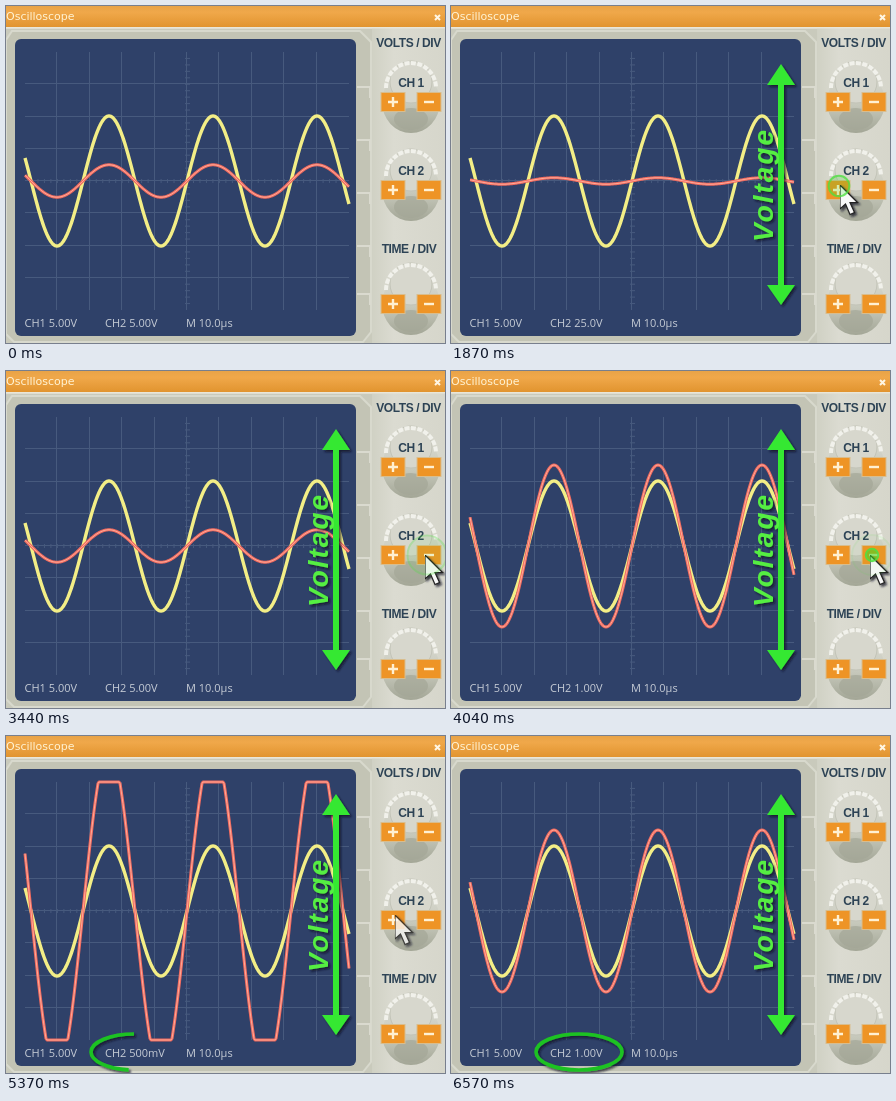
An HTML page for the animation above (6.97 s loop, 439 by 337 pixels).

```html
<!DOCTYPE html>
<html lang="en">
<head>
<meta charset="utf-8">
<title>Oscilloscope</title>
<style>
html, body { margin: 0; width: 100%; height: 100%; overflow: hidden; background: #d5d5ca; }
svg { display: block; width: 439px; height: 337px; }
.readout { font: 11px "Open Sans", sans-serif; fill: #c6ccd6; }
.label { font: bold 12px "Liberation Sans", Arial, sans-serif; letter-spacing: -.4px; fill: #2d4355; text-anchor: middle; }
.trace { fill: none; stroke-linejoin: round; }
</style>
</head>
<body>
<svg viewBox="0 0 439 337">
  <defs>
    <linearGradient id="bar" x2="0" y2="1">
      <stop stop-color="#e8a347"/><stop offset=".3" stop-color="#f0a84a"/><stop offset="1" stop-color="#e1942f"/>
    </linearGradient>
    <linearGradient id="side">
      <stop stop-color="#d0d1c4"/><stop offset=".3" stop-color="#dbdbd1"/><stop offset="1" stop-color="#d6d6cb"/>
    </linearGradient>
    <linearGradient id="base" x2="0" y2="1">
      <stop stop-color="#dcdcd3"/><stop offset=".55" stop-color="#c6c8bb"/><stop offset="1" stop-color="#a3a696"/>
    </linearGradient>
    <filter id="shadow" filterUnits="userSpaceOnUse" x="0" y="0" width="439" height="337">
      <feDropShadow dx="2" dy="2" stdDeviation="1.2" flood-color="#0c1420" flood-opacity=".75"/>
    </filter>
  </defs>

  <!-- case -->
  <rect width="439" height="337" fill="#d5d5ca"/>
  <rect y="23" width="366" height="314" fill="#c9cabc"/>
  <path d="M0 34L6 25H354L365 36V326L357 336H8L0 328Z" fill="#c3c4b5" stroke="#d8d9cd" stroke-width="2"/>
  <path d="M351 81H364V92M351 134H364V145M351 187H364V198M351 240H364V251M351 288H364V299" fill="none" stroke="#dadacf" stroke-width="2"/>
  <rect x="366" y="22" width="73" height="315" fill="url(#side)"/>
  <rect width="439" height="21" fill="url(#bar)"/>
  <rect y="21" width="439" height="1.5" fill="#e9e6d8"/>
  <text y="14" style="font:11px 'DejaVu Sans',sans-serif" fill="#fff3d4">Oscilloscope</text>
  <path d="M429 9l5 5m0-5l-5 5" stroke="#fff6e4" stroke-width="2"/>
  <rect x="9" y="33" width="341" height="297" rx="6" fill="#2f4169"/>

  <path id="grid" fill="none" stroke="#475a7e"/>
  <path id="yellow" class="trace" stroke="#f3ee86" stroke-width="3.4"/>
  <path id="red" class="trace" stroke="#f16b5f" stroke-width="3"/>
  <path id="core" class="trace" stroke="#ffaa98" stroke-width="1"/>
  <g class="readout">
    <text x="18.5" y="321">CH1 5.00V</text>
    <text id="volts" x="99" y="321"></text>
    <text x="180" y="321">M 10.0µs</text>
  </g>

  <g id="knobs"></g>
  <g class="label">
    <text x="402.5" y="41">VOLTS / DIV</text>
    <text x="405" y="81">CH 1</text>
    <text x="405" y="168.500">CH 2</text>
    <text x="403" y="247">TIME / DIV</text>
  </g>

  <g id="arrow" filter="url(#shadow)" fill="#36e832">
    <path d="M330 58L344 79H333V279H344L330 299L316 279H327V79H316Z"/>
    <text transform="translate(322 236) rotate(-90)" fill="#55ee42" letter-spacing="2"
      style="font:italic bold 28px 'Liberation Sans',Arial,sans-serif">Voltage</text>
  </g>
  <path id="loop" filter="url(#shadow)" d="M128 298A43 18 0 0 0 128 334A43 18 0 0 0 128 298" pathLength="100"
    fill="none" stroke="#1fc222" stroke-width="3.6"/>
  <g id="cursors"></g>
  <g id="rings"></g>
</svg>
<script>
const $ = id => document.getElementById(id);
const LOOP = 6970, LIFE = 600, LEFT = 19, RIGHT = 343, TOP = 46, BOTTOM = 304, MID = 175;
const clamp = (v, lo = 0, hi = 1) => Math.min(hi, Math.max(lo, v));
const ramp = (t, from, to) => clamp((t - from) / (to - from));

// [time, volts per division, button: 0 plus, 1 minus]
const clicks = [
  [1030, 10, 0], [1750, 25, 0], [2540, 10, 1], [3020, 5, 1],
  [3500, 2.5, 1], [3980, 1, 1], [4460, .5, 1], [5970, 1, 0]
];
const ringAt = [[388, 180], [421, 184]];

function wave(amp) {
  let d = "";
  for (let x = LEFT; x <= RIGHT; x++) {
    const y = MID - amp * Math.sin((x - 181) * Math.PI / 52);
    d += (d ? "L" : "M") + x + " " + clamp(y, TOP, BOTTOM).toFixed(2);
  }
  return d;
}

function gridPath() {
  let d = "";
  for (let i = 1; i < 10; i++) d += `M${Math.round(LEFT + i * 32.4) - .5} ${TOP}V${BOTTOM}`;
  for (let i = 1; i < 8; i++) d += `M${LEFT} ${Math.round(TOP + i * 32.25) - .5}H${RIGHT}`;
  for (let i = 1; i < 40; i++) d += `M179 ${TOP + i * 6.45}h5`;
  for (let i = 1; i < 50; i++) d += `M${LEFT + i * 6.48} 173v4`;
  return d;
}

const knob = y => `
  <ellipse cx="405" cy="${y}" rx="29" ry="31" fill="url(#base)"/>
  <circle cx="405" cy="${y - 20}" r="21" fill="#d7d7cd" stroke="#c3c4b8"/>
  <path d="M380 ${y - 14}A25 25 0 1 1 430 ${y - 14}" fill="none" stroke="#f1f1eb" stroke-width="4" stroke-dasharray="5 1.5"/>
  <ellipse cx="405" cy="${y + 17}" rx="17" ry="11" fill="#a4a798" opacity=".7"/>` +
  [387, 423].map((x, i) => `
  <rect x="${x - 12}" y="${y - 9.5}" width="24" height="19" fill="#ee9426" stroke="#d9bd8d"/>
  <path d="M${x - 5} ${y}h10${i ? "" : `M${x} ${y - 5}v10`}" stroke="#fff0d2" stroke-width="2.4"/>`).join("");

const cursor = ([x, y]) => `<path transform="translate(${x} ${y})" filter="url(#shadow)"
  d="M0 0V24L5.500 19L10 29.500L14.500 27.500L10 17.500H17.500Z" fill="#f8f8f8" stroke="#222" stroke-width="1.2"/>`;

$("grid").setAttribute("d", gridPath());
$("yellow").setAttribute("d", wave(65));
$("knobs").innerHTML = [96, 184, 298].map(knob).join("");
$("cursors").innerHTML = [[389, 179], [419, 184]].map(cursor).join("");
$("rings").innerHTML = clicks.map(([, , b]) =>
  `<circle cx="${ringAt[b][0]}" cy="${ringAt[b][1]}" fill="#35dc22" stroke="#4ee040" stroke-width="2"/>`).join("");
const [plus, minus] = $("cursors").children;
const rings = [...$("rings").children];
let shown;

function showVolts(v) {
  if (v === shown) return;
  shown = v;
  const d = wave(81 / v);
  $("red").setAttribute("d", d);
  $("core").setAttribute("d", d);
  $("volts").textContent = "CH2 " + (v < 1 ? v * 1000 + "mV" : v.toPrecision(3) + "V");
}

function draw(t) {
  const intro = t < 460 ? 0 : ramp(t, 400, 830);
  showVolts(clicks.reduce((v, c) => t >= c[0] ? c[1] : v, 5));
  $("arrow").style.opacity = intro;

  plus.style.opacity = t < 3500
    ? intro * (1 - ramp(t, 2050, 2350))
    : ramp(t, 5130, 5430) * (1 - ramp(t, 6150, 6570));
  minus.style.opacity = ramp(t, 2110, 2410) * (1 - ramp(t, 4800, 5130));

  rings.forEach((ring, i) => {
    const p = (t - clicks[i][0]) / LIFE, on = p >= 0 && p < 1;
    ring.style.display = on ? "" : "none";
    if (!on) return;
    ring.setAttribute("r", 1 + 19 * (1 - (1 - p) ** 3));
    ring.style.opacity = 1 - p;
    ring.style.fillOpacity = Math.max(.25, 1 - p * 4);
  });

  const drawn = ramp(t, 5130, 5640) * 100;
  $("loop").style.display = drawn ? "" : "none";
  $("loop").style.strokeDasharray = drawn < 100 ? drawn + " 200" : "none";
}

const start = performance.now();
function tick() {
  draw((performance.now() - start) % LOOP);
  requestAnimationFrame(tick);
}
tick();
</script>
</body>
</html>
```
